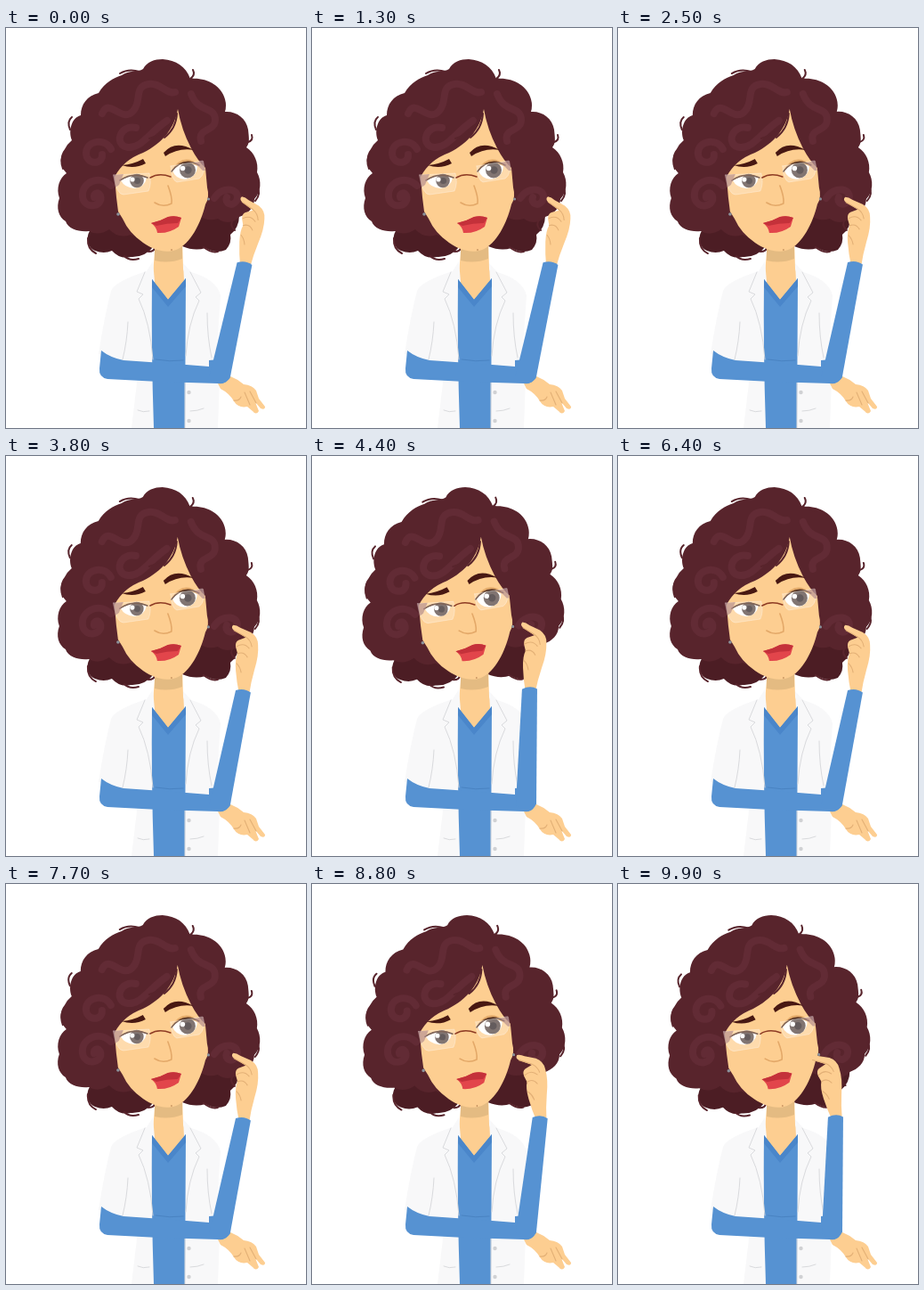
An HTML page that plays this animation: 337 by 449 pixels, repeating every 10 s.

```html
<!DOCTYPE html>
<html lang="en">
<head>
<meta charset="utf-8">
<title>Thinking doctor</title>
<style>
html, body { margin: 0; height: 100%; overflow: hidden; background: #fff; }
svg { display: block; width: 100%; height: 100%; }
path { stroke-linecap: round; stroke-linejoin: round; }
.line { fill: none; stroke: #d9dadd; stroke-width: 1; }
.skin { fill: #fdce91; }
.fold { fill: none; stroke: #e3b076; stroke-width: 1.1; }
.blue { fill: #5692d2; }
.coat { fill: #f8f8f9; }
.hair { fill: #58242c; }
.shade { fill: #4c1d24; }
.wisp { fill: none; stroke: #58242c; stroke-width: 2; }
.shine { fill: none; stroke: #622b35; stroke-width: 8; }
.brow { fill: #481812; }
.lid { fill: none; stroke: #54301f; stroke-width: 1.6; }
</style>
</head>
<body>
<svg viewBox="0 0 337 449">
  <!-- hair behind the neck and the face -->
  <g class="head">
    <path class="shade" d="M72 205Q76 227 94 228C89 236 92 247 100 250Q110 254 119 250Q128 260 140 257
      Q156 258 167 244L198 245Q212 251 224 247Q236 254 247 249Q254 241 252 232Q262 224 262 210L160 190Z"/>
    <path class="hair" d="M130 53C138 47 148 50 154 46C158 38 167 35 176 35C191 36 202 43 207 57
      C224 55 242 64 246 80Q248 87 246 94C258 93 270 101 272 114C273 124 274 129 270 134
      C279 140 284 151 282 162C287 171 287 184 279 192C279 202 271 209 262 212C256 219 246 220 238 214
      Q226 218 216 210L166 222Q154 240 140 232Q126 237 116 226Q104 234 93 228C82 229 70 226 67 217
      C59 212 56 202 60 191C56 180 60 168 68 163C60 155 60 143 66 136Q69 130 74 126
      C70 116 73 101 84 98C84 86 91 76 104 73C111 61 121 56 130 53Z"/>
    <path class="wisp" d="M128 51Q138 45 150 49M207 57Q213 53 210 47M208 57Q219 63 228 62M72 114Q68 105 74 100
      M272 128Q278 126 276 120M282 178Q287 186 280 194M256 214Q250 221 257 227M66 139Q60 147 64 158
      M92 236Q91 248 101 253M133 256Q139 262 149 259M160 251Q167 251 167 246M222 246Q231 253 238 251"/>
    <g class="shine">
      <path d="M108 96C116 77 130 108 143 93C153 82 143 66 160 63C174 61 180 75 190 72"/>
      <path d="M118 136C111 123 91 126 90 140C90 154 109 154 108 142"/>
      <path d="M118 177C105 164 84 173 86 190C89 205 110 200 106 188C103 183 98 186 99 190"/>
      <path d="M146 112C127 108 121 132 137 134C153 135 162 116 181 104"/>
      <path d="M208 74C216 96 235 87 235 103C235 117 215 112 219 127"/>
      <path d="M234 191C243 176 265 180 259 194C254 202 245 196 248 190"/>
    </g>
  </g>

  <!-- body -->
  <path class="skin" d="M168 238L165 276L162 284L182 307L203 283L199 270L198 236Z"/>
  <path fill="#e4bb82" d="M167 245L198 240V259Q183 265 167 261Z"/>
  <path class="coat" d="M165 262L158 273Q123 284 118 295Q110 326 104 366L132 374L148 390L141 449H167V285Z"/>
  <path class="coat" d="M199 264L208 274Q236 282 241 300L236 373L240 393L238 449H200V283Z"/>
  <path class="blue" d="M164 282L182 305L202 281L201 449H166Q163 360 164 282Z"/>
  <path fill="#4a86ca" d="M164 282L182 305L202 281V290L182 313L164 291Z"/>
  <path fill="none" stroke="#4983c2" d="M168 372Q184 375 199 373"/>
  <path class="line" d="M156 274L147 296L154 299L149 304Q162 331 165 372M207 274L219 297L213 302L217 306Q204 333 202 368
    M137 330Q136 352 131 372M226 320Q226 347 231 370M201 398V449M148 429Q154 432 161 430M207 430Q215 430 222 427"/>
  <g fill="#d0d1d4"><circle cx="205.500" cy="409" r="2.200"/><circle cx="205.500" cy="441" r="2.200"/></g>
  <path class="skin" d="M238 399Q242 391 252 391Q260 394 267 400Q277 401 281 407L284 416L291 425Q291 429 286 427
    L280 420L284 430Q281 435 277 430L271 425Q261 427 256 419Q251 410 241 405Z"/>
  <path class="fold" d="M268 409L274 423M274 408L281 421M256 418Q262 419 264 414"/>
  <path class="blue" d="M107 362Q117 370 132 373L190 377L228 380V373L240 372L250 385L249 395Q246 400 238 399
    L172 397L114 394Q104 392 105 382Z"/>

  <!-- face -->
  <g class="head">
    <path class="skin" d="M193 91C189 113 176 129 154 140Q132 148 122 167L124 190L126 206L131 214
      Q138 230 154 241C167 250 180 253 191 249C207 243 219 219 224 198Q229 190 226 179L224 157
      Q216 150 208 135Q197 114 193 91Z"/>
    <path class="wisp" d="M190 94Q185 117 161 124M192 96Q191 113 178 123"/>
    <g fill="#8b929b"><circle cx="126" cy="209" r="1.800"/><circle cx="227.500" cy="192" r="1.600"/></g>
    <path class="brow" d="M130 154Q143 153 154 147L157 152Q144 159 130 154Z"/>
    <path class="brow" d="M177 140Q190 125 211 137Q194 134 179 144Z"/>

    <path fill="#fff" d="M129 171Q143 162 158 168Q156 179 144 180Q133 179 129 171Z"/>
    <circle cx="147" cy="171.500" r="7.800" fill="#574642"/>
    <circle cx="147.500" cy="171.500" r="3.600" fill="#302526"/>
    <circle cx="142" cy="170" r="2.600" fill="#fff"/>
    <path class="lid" d="M128 171Q143 161 159 168"/>
    <path fill="#e3aa69" d="M186 160Q198 139 217 153L214 157Z"/>
    <path fill="#fff" d="M187 160Q200 146 215 155Q214 168 201 170Q190 169 187 160Z"/>
    <circle cx="204" cy="159.500" r="9" fill="#574642"/>
    <circle cx="204.500" cy="159.500" r="4.200" fill="#302526"/>
    <circle cx="198.500" cy="157.500" r="2.800" fill="#fff"/>
    <path class="lid" d="M186 161Q199 144 217 154"/>

    <g fill="#fff" fill-opacity=".25" stroke="#fff" stroke-opacity=".4" stroke-width=".8">
      <path d="M121 165L161 163Q164 174 160 183L132 187Q124 187 121 165Z"/>
      <path d="M185 155L221 149Q225 163 217 169L192 173Q186 171 185 155Z"/>
    </g>
    <path fill="#b38b8b" opacity=".65" d="M120 165L132 164L127 176L123 179ZM212 151L222 149L224 160L221 160Z"/>
    <path fill="none" stroke="#8d3b24" stroke-width="1.500" d="M162 168Q172 162 185 167"/>

    <path fill="none" stroke="#e3a868" stroke-width="1.600" d="M167 196Q176 202 186 197Q187 190 182 177"/>
    <path fill="#e2454b" d="M163 219Q173 217 182 212Q190 210 197 213L194 223Q183 231 170 230Q169 223 163 219Z"/>
    <path fill="#c4313a" d="M163 219Q173 217 182 212Q190 210 197 213L193 219Q181 219 169 222Z"/>
    <circle cx="186" cy="249" r=".8" fill="#a97447"/>
  </g>

  <!-- raised arm -->
  <g id="hand">
    <path class="skin" d="M-5 4Q-8 -10 -9 -23Q-10 -36 -7 -42L-9 -49Q-10 -55 -6 -57L2 -60L-11 -68
      Q-15 -71 -12 -74Q-8 -74 -4 -71L8 -66Q16 -61 16 -52Q17 -40 12 -24Q8 -10 6 4Z"/>
    <path class="fold" d="M-11 -68L2 -61Q8 -57 9 -50M-8 -50Q0 -55 6 -48M-7 -42Q0 -45 4 -38M-8 -31Q-4 -27 -3 -21"/>
  </g>
  <path id="forearm" class="blue" d="M-9 -128Q0 -133 8 -129L12 0Q9 8 0 9L-11 3Z"/>
</svg>
<script>
const loop = 10000, step = 100, period = 1300;
const elbow = [240, 390], reach = 129;
const heads = document.querySelectorAll('.head');
const hand = document.getElementById('hand');
const forearm = document.getElementById('forearm');

function draw(now) {
  const time = Math.floor(now % loop / step) * step;
  const swing = time / period * 2 * Math.PI;
  const arm = 6.74 + 6.06 * Math.cos(swing);
  // The wrist trails the forearm by a sixth of a swing.
  const wrist = -0.3 + 13.85 * Math.cos(swing - 1.06);
  const lean = (1 - Math.cos(swing)) / 2;
  const a = arm * Math.PI / 180;

  forearm.setAttribute('transform', `translate(${elbow}) rotate(${arm})`);
  hand.setAttribute('transform',
    `translate(${elbow[0] + reach * Math.sin(a)} ${elbow[1] - reach * Math.cos(a)}) rotate(${wrist})`);
  for (const head of heads)
    head.setAttribute('transform', `translate(${-1.2 * lean} 0) rotate(${-0.85 * lean} 182 255)`);
}

function tick() {
  draw(performance.now());
  requestAnimationFrame(tick);
}
tick();
</script>
</body>
</html>
```
